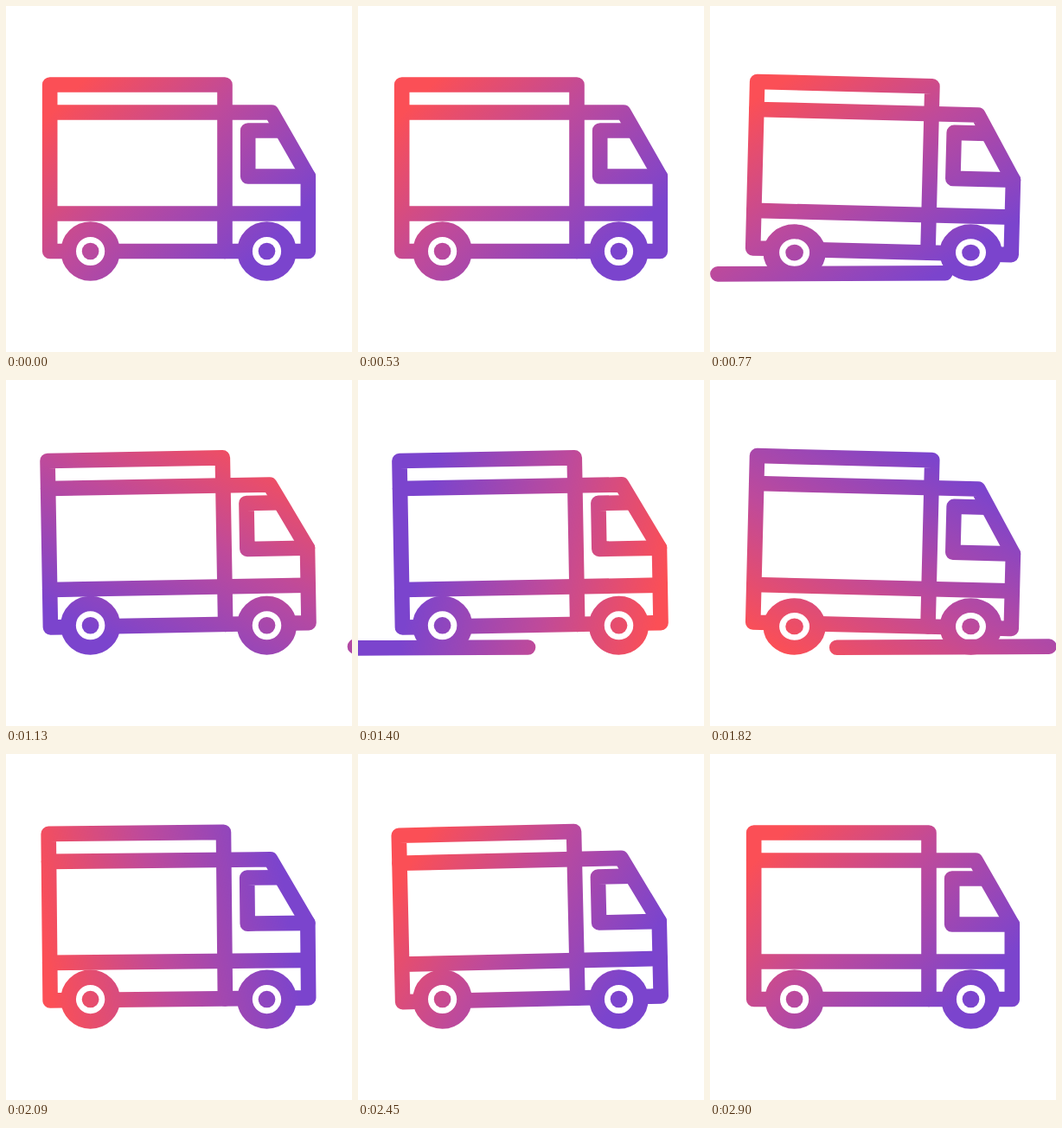
Animation of 400 by 400 pixels, one loop 2990 ms. Source, as an HTML page without scripts:

```html
<!DOCTYPE html>
<html lang="en">
<head>
<meta charset="utf-8">
<title>Delivery truck</title>
<style>
  :root { --loop: 2.99s infinite; --sway: cubic-bezier(.37, 0, .63, 1); }
  html, body { margin: 0; width: 100%; height: 100%; overflow: hidden; background: #fff; }
  svg { display: block; width: 100vw; height: 100vh; }

  .ink { fill: none; stroke: #fff; stroke-width: 17.6; stroke-linecap: round; stroke-linejoin: round; }
  .hub { fill: #fff; stroke: none; }

  .sweep { transform-origin: 200px 200px; animation: turn var(--loop) cubic-bezier(.35, 0, .43, 1); }
  .body { transform-origin: 190px 243px; animation: rock var(--loop) var(--sway); }
  .wheel { transform-origin: var(--x) 317.5px; animation: squash var(--loop) var(--sway); }
  .streak { stroke-dasharray: 0 0 0 999; animation: pass var(--loop) linear var(--start); }

  @keyframes turn {
    0%, 17.7% { transform: rotate(0deg); }
    97%, 100% { transform: rotate(360deg); }
  }
  @keyframes rock {
    0%, 17.7%, 97%, 100% { transform: rotate(0deg); }
    26.3%, 59.2% { transform: rotate(1.5deg); }
    42.3%, 76.6% { transform: rotate(-1.55deg); }
  }
  @keyframes squash {
    0%, 17.7%, 42%, 72%, 100% { transform: scale(1, 1); }
    26.3%, 59.5% { transform: scale(1.055, .955); }
  }
  /* dashes: dot off stage, gap before the streak, streak length, rest */
  @keyframes pass {
    0% { stroke-dasharray: 0 0 0 999; }
    5% { stroke-dasharray: 0 76 245 999; }
    8% { stroke-dasharray: 0 196 262 999; }
    10% { stroke-dasharray: 0 270 290 999; }
    14% { stroke-dasharray: 0 477 100 999; }
    17%, 100% { stroke-dasharray: 0 600 0 999; }
  }
</style>
</head>
<body>
<svg viewBox="0 0 400 400">
  <defs>
    <linearGradient id="hue" gradientUnits="userSpaceOnUse" x1="88" y1="88" x2="290" y2="290">
      <stop offset="0" stop-color="#fb4f56"/>
      <stop offset=".47" stop-color="#be4a9b"/>
      <stop offset="1" stop-color="#7b44cd"/>
    </linearGradient>

    <path id="road" d="M470 309H-130" transform="rotate(-.25 200 309)"/>

    <mask id="truck" maskUnits="userSpaceOnUse" x="0" y="0" width="400" height="400">
      <g class="ink">
        <g class="body">
          <path d="M68 283.5H50.7V91H253V283.5"/>
          <path d="M50.7 123H307L349.3 197V283.5H331"/>
          <path d="M50.7 240H349.3M127 283.5H272"/>
          <path d="M318 144H279.7V197H349.3"/>
        </g>

        <g class="wheel" style="--x: 97.6px">
          <circle cx="97.6" cy="283.5" r="25.4"/>
          <circle class="hub" cx="97.6" cy="283.5" r="9.8"/>
        </g>
        <g class="wheel" style="--x: 301.5px">
          <circle cx="301.5" cy="283.5" r="25.4"/>
          <circle class="hub" cx="301.5" cy="283.5" r="9.8"/>
        </g>

        <use href="#road" class="streak" style="--start: .53s"/>
        <use href="#road" class="streak" style="--start: 1.1s"/>
        <use href="#road" class="streak" style="--start: 1.67s"/>
      </g>
    </mask>
  </defs>

  <g mask="url(#truck)">
    <rect class="sweep" x="-100" y="-100" width="600" height="600" fill="url(#hue)"/>
  </g>
</svg>
</body>
</html>
```
